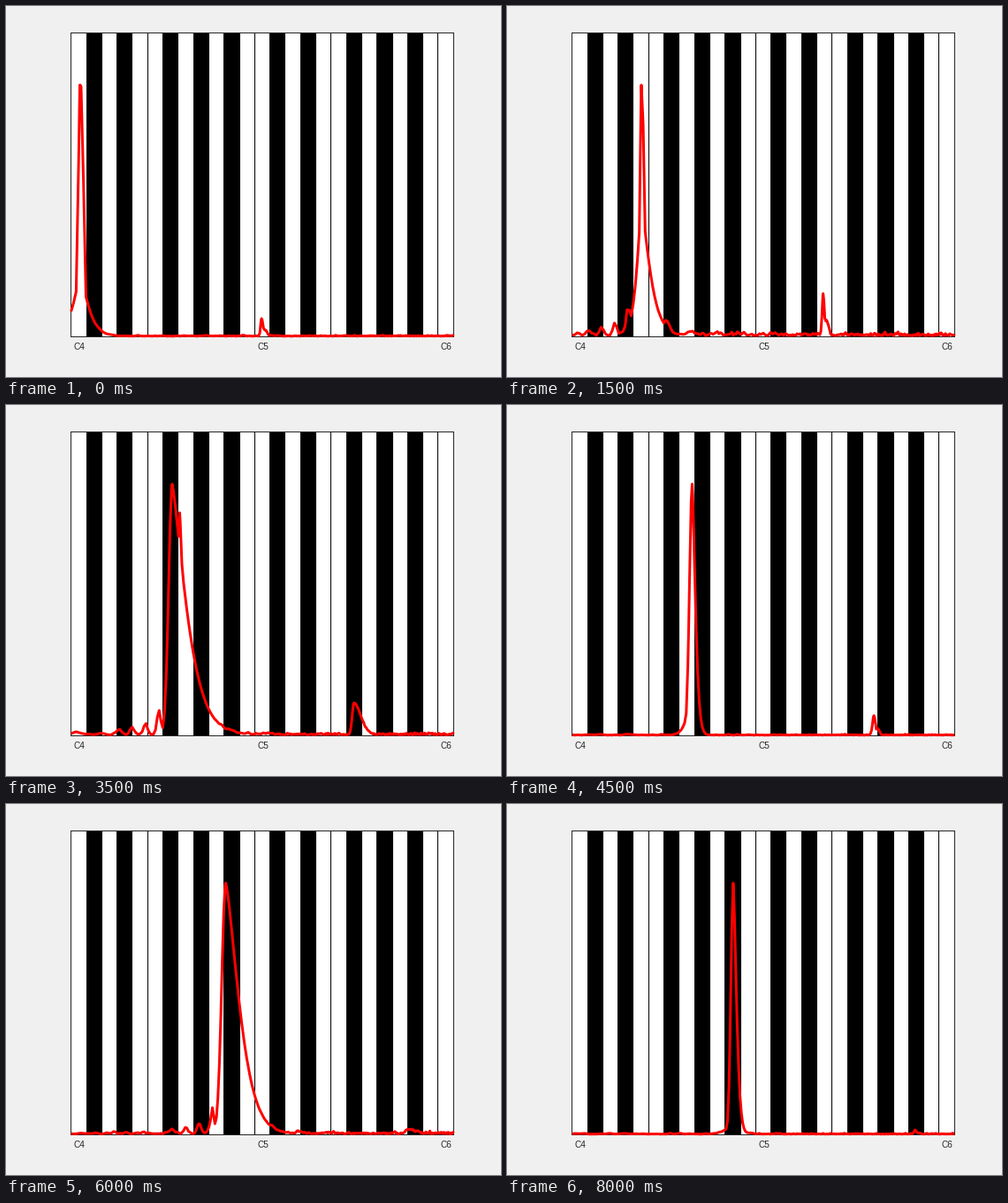
A matplotlib script for the animation above (8.5 s loop, 560x420 px).

```python
import numpy as np
import matplotlib.pyplot as plt
from matplotlib.animation import FuncAnimation
from matplotlib.patches import Rectangle

W, H, DPI = 560, 420, 100
PT = 72 / DPI  # points per pixel
LEFT, TOP, BASE, PEAK = 73.7, 30, 374, 284.5
KEY, KEYS = 17.3, 25
RIGHT = LEFT + KEYS * KEY
OCTAVE = 12 * KEY
C4_X = 83.1
BLACK_KEYS = {1, 3, 6, 8, 10}


def tone(left, right, power, side, ripple=0, noise=0.4):
    """Peak half-widths and falloff, plus a side bump (offset, height, widths)."""
    return dict(left=left, right=right, power=power, side=side,
                ripple=ripple, noise=noise)


PLUCK = tone(2.2, 5, 4, (0.5, 70, 11, 12))
STRUCK = tone(1.6, 3.2, 4, (0, 150, 7, 13), ripple=34, noise=1.6)
BEND = tone(5.2, 6.3, 4, (-9.5, 136, 3, 3), ripple=22, noise=1)
ONSET = tone(6.3, 21, 1.4, (-15, 30, 3, 3), ripple=26, noise=1.1)
DOUBLE = tone(5.6, 22, 1.3, (8.5, 252, 3, 7), ripple=28, noise=1.1)
LEAN = tone(4.3, 5, 1.5, (-4, 28, 6, 5))
STEADY = tone(3.8, 5, 1.5, (0, 14, 9, 9))

# Tone, peak position and overtone height for each half second.
STEPS = [
    (PLUCK, 83.5, 20), (STEADY, 84.5, 8), (DOUBLE, 117.5, 20),
    (STRUCK, 152, 48), (LEAN, 152.5, 22), (BEND, 154.5, 18),
    (BEND, 154.5, 18), (DOUBLE, 188, 36), (LEAN, 188.5, 22),
    (LEAN, 209.5, 22), (LEAN, 237, 12), (LEAN, 239, 8),
    (ONSET, 248.5, 5), (STEADY, 253, 4), (STEADY, 255.5, 4),
    (STEADY, 256, 4), (STEADY, 256, 4),
]

# Evenly spaced frequency bins on the logarithmic pitch axis.
BINS = C4_X + OCTAVE * np.log2(np.arange(253.5, 1076, 2.44) / 261.63)
BINS = BINS[(BINS > LEFT) & (BINS < RIGHT)]


def bump(x, centre, height, left, right, left_power=1.3, right_power=1.3):
    d = x - centre
    rise = np.abs(np.minimum(d, 0) / left) ** left_power
    fall = np.abs(np.maximum(d, 0) / right) ** right_power
    return height * np.exp(-rise - fall)


def spectrum(i):
    t, peak, overtone = STEPS[i]
    left, right, power, ripple = t["left"], t["right"], t["power"], t["ripple"]
    offset, height, side_left, side_right = t["side"]
    upper = peak + OCTAVE - 2
    x = np.union1d(BINS, [LEFT, peak, peak + offset, upper, RIGHT])

    parts = [
        bump(x, peak, PEAK, left, right, 2, power),
        bump(x, peak + offset, height, side_left, side_right),
        bump(x, upper, overtone, max(left / 2, 1.5), max(right / 2, 2), 2, 2),
        bump(x, upper + 4, overtone * 0.35, 3, 3, 2, 2),
    ]
    for j in range(1, 5):
        parts.append(bump(x, peak - 15 * j, ripple / j ** 1.2, 3, 3, 2, 2))
        parts.append(bump(x, peak + 28 * j, ripple / (2 * j * j), 6, 6, 2, 2))
    level = np.max(parts, axis=0)

    rng = np.random.default_rng(40 + i)
    rough = np.convolve(rng.normal(size=x.size + 2), [0.5, 0.8, 0.5], "valid")
    level += t["noise"] * (0.5 + np.abs(rough)) * np.exp(-level / 30)
    return x, BASE - level


def box(x0, y0, x1, y1, color):
    ax.add_patch(Rectangle((x0, y0), x1 - x0, y1 - y0, fc=color, lw=0))


def edge(k):
    return int(LEFT + k * KEY)


fig = plt.figure(figsize=(W / DPI, H / DPI), dpi=DPI, facecolor="#f0f0f0")
ax = fig.add_axes([0, 0, 1, 1])
ax.set_xlim(0, W)
ax.set_ylim(H, 0)
ax.axis("off")

x0, x1 = edge(0), edge(KEYS)
box(x0, TOP, x1 + 1, BASE + 1, "#262626")
box(x0 + 1, TOP + 1, x1, BASE, "white")
for k in range(KEYS):
    if k % 12 in BLACK_KEYS:
        box(edge(k), TOP + 1, edge(k + 1) + 1, BASE, "black")
    elif k % 12 in (4, 11):
        box(edge(k + 1), TOP + 1, edge(k + 1) + 1, BASE, "black")

for n in range(3):
    ax.text(C4_X + n * OCTAVE, 389, f"C{4 + n}", ha="center", va="baseline",
            family="Liberation Sans", fontsize=10 * PT, color="#262626")

curve, = ax.plot([], [], color="red", lw=3 * PT,
                 solid_joinstyle="round", solid_capstyle="butt")


def update(i):
    curve.set_data(*spectrum(i))
    return curve,


anim = FuncAnimation(fig, update, frames=len(STEPS), interval=500,
                     repeat=True, repeat_delay=0)
plt.show()
```
